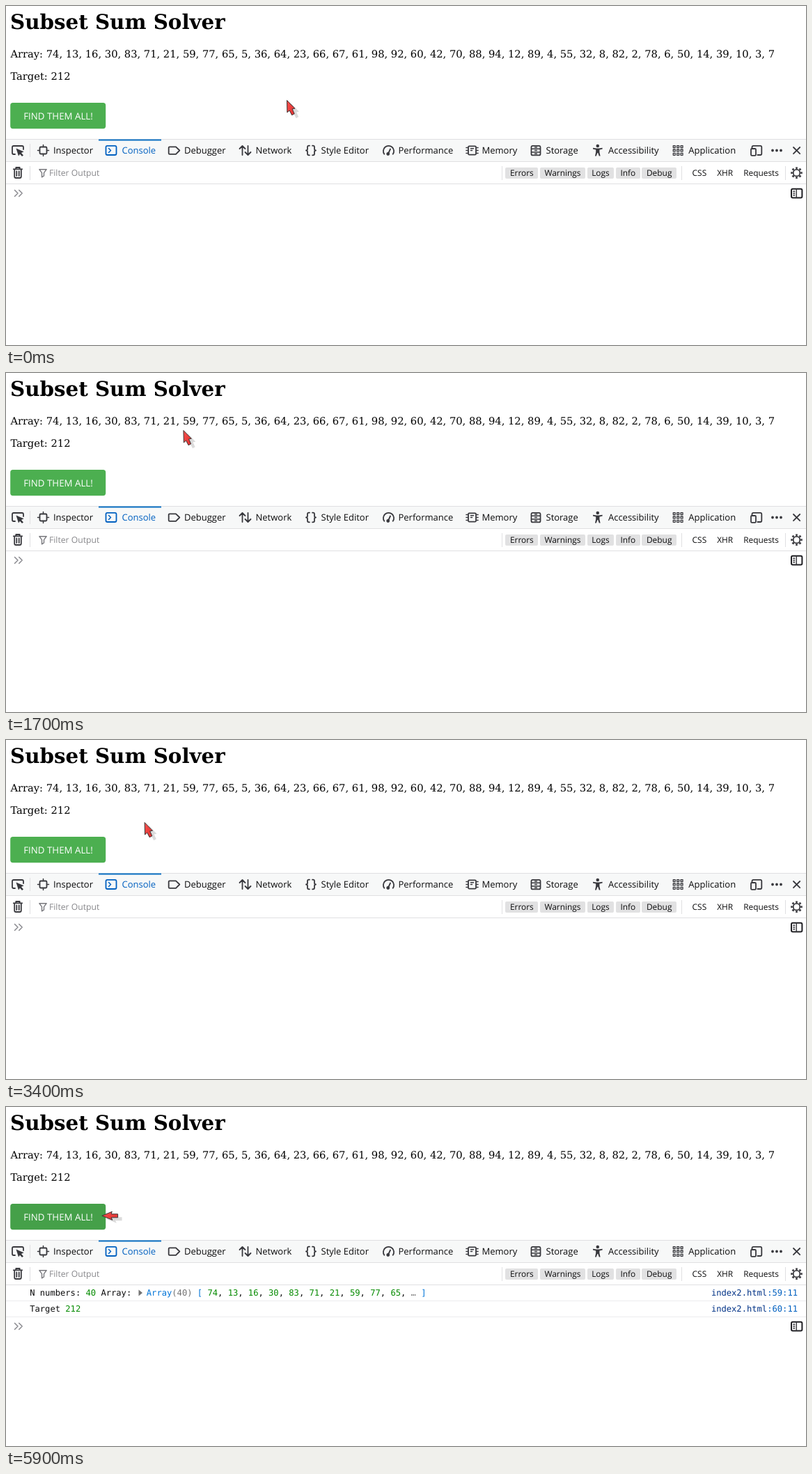
Animation of 1149 by 487 pixels, one loop 8000 ms. Source, as an HTML page:

```html
<!DOCTYPE html>
<html lang="en">
<head>
<meta charset="utf-8">
<title>Subset Sum Solver</title>
<style>
html, body { margin: 0; width: 100%; height: 100%; overflow: hidden; background: #fff; }
svg { display: block; }
text, .filters { font-family: "Open Sans", "Noto Sans", sans-serif; text-rendering: geometricPrecision; }
text { fill: #0c0c0d; white-space: pre; }
.page text { font: 14.7px "DejaVu Serif", serif; fill: #000; }
.page .title { font-weight: bold; font-size: 29.33px; }
.page .label { font: 13.3px "Open Sans", "Noto Sans", sans-serif; fill: #fff; }
.tabs text { font-size: 13px; stroke: none; }
.filters { position: absolute; top: 232px; display: flex; font-size: 11.9px; line-height: 16px; color: #0c0c0d; }
.pills { right: 186px; gap: 2.5px; }
.pills span { padding: 0 6.6px; border-radius: 2px; background: #e1e1e2; }
.plain { right: 39px; gap: 15px; }
.log text { font: 12.13px "DejaVu Sans Mono", monospace; }
.num { fill: #058b00; }
.obj { fill: #0074d8; }
.dim { fill: #737373; }
.file { fill: #003286; }
.line { fill: #0060c0; }
.icon { fill: none; stroke: #38383d; stroke-width: 1.8; stroke-linejoin: round; stroke-linecap: round; }
.icon .solid { fill: #38383d; stroke: none; }
.icon .active { stroke: #0060c0; }
.icon .active text { fill: #0060c0; }
.rule { stroke: #e0e0e2; }
</style>
</head>
<body>
<svg width="1149" height="487" viewBox="0 0 1149 487">
  <g class="page">
    <text class="title" x="6" y="33">Subset Sum Solver</text>
    <text id="array" x="6.4" y="74">Array: 74, 13, 16, 30, 83, 71, 21, 59, 77, 65, 5, 36, 64, 23, 66, 67, 61, 98, 92, 60, 42, 70, 88, 94, 12, 89, 4, 55, 32, 8, 82, 2, 78, 6, 50, 14, 39, 10, 3, 7</text>
    <text x="6.4" y="106">Target: 212</text>
    <rect id="button" x="6.2" y="139" width="137" height="37.3" rx="3.7"/>
    <text class="label" x="75" y="162.5" text-anchor="middle">FIND THEM ALL!</text>
  </g>

  <rect y="192" width="1149" height="31" fill="#f7f8f8"/>
  <path class="rule" d="M0 191.5H1149M0 223.5H1149M0 255.5H1149M34.5 198V217M34.5 230V250M712.5 230V250M970.5 230V250M1119.5 230V250"/>
  <rect x="133" y="191.5" width="90" height="2" fill="#0a70c4"/>

  <g class="icon">
    <path d="M13 213H11Q9 213 9 211V203Q9 201 11 201H23Q25 201 25 203V206"/>
    <path class="solid" d="M14.5 204.5L25.6 209.3L22 210.9L25 214.5L23 216L20 212.8L18 215.5Z"/>
  </g>

  <g class="icon tabs">
    <rect x="48.5" y="202.5" width="10" height="10" rx="1.5"/>
    <path d="M45.5 207.5H48M59 207.5H61.5M53.5 199.5V202M53.5 213V215.5" stroke-width="1.5"/>
    <text x="68" y="212">Inspector</text>

    <g class="active">
      <rect x="143.5" y="200.8" width="15" height="13.2" rx="2"/>
      <path d="M147.5 204.5L150.5 207.5L147.5 210.5" stroke-width="1.5"/>
      <text x="166.5" y="212">Console</text>
    </g>

    <path d="M235 202.3H244L249.3 207.5L244 212.8H235Q233.7 212.8 233.7 211.5V203.6Q233.7 202.3 235 202.3Z"/>
    <text x="256" y="212">Debugger</text>

    <path d="M339.5 214V201.5M335.5 205L339.5 201L343.5 205M347.5 201V213.5M343.5 210L347.5 214L351.5 210"/>
    <text x="358.5" y="212">Network</text>

    <path id="brace" d="M436 200.7H435Q433 200.7 433 203V205.3Q433 207.5 431 207.5Q433 207.5 433 209.7V212Q433 214.3 435 214.3H436"/>
    <use href="#brace" transform="matrix(-1 0 0 1 876 0)"/>
    <text x="452.5" y="212">Style Editor</text>

    <path d="M543.3 212.8A7.6 7.6 0 1 1 555.7 212.8M549 212L552 205.5"/>
    <circle class="solid" cx="548.7" cy="212.5" r="2.4"/>
    <text x="563.5" y="212">Performance</text>

    <rect x="664" y="201.3" width="11" height="12.4" rx="1.5"/>
    <path d="M661 203.5H663M661 207.5H663M661 211.5H663M676 203.5H678M676 207.5H678M676 211.5H678M667.5 204.7H671.5M667.5 207.5H669.5" stroke-width="1.6"/>
    <text x="683.5" y="212">Memory</text>

    <rect x="754.5" y="200.8" width="13" height="13.6" rx="2"/>
    <path d="M755 205.2H767M755 210H767M759.5 203H762.5M759.5 207.6H762.5M759.5 212.3H762.5" stroke-width="1.5"/>
    <text x="775.5" y="212">Storage</text>

    <circle class="solid" cx="849.8" cy="201" r="2.3"/>
    <path class="solid" d="M843 203.8L848 204.5H851.6L856.6 203.8V205.6L852.4 206.6V210L853.6 215.5H851.8L850.2 211H849.4L847.8 215.5H846L847.2 210V206.6L843 205.6Z"/>
    <text x="865" y="212">Accessibility</text>

    <g id="grid" stroke-width="1.3"></g>
    <text x="980.3" y="212">Application</text>
  </g>

  <g class="icon">
    <path d="M1071.5 209V203Q1071.5 200.8 1073.5 200.8H1083.5Q1085.3 200.8 1085.3 203V212Q1085.3 214 1083.5 214H1079.5"/>
    <rect x="1070" y="205" width="7" height="9.8" rx="1.3" fill="#f7f8f8"/>
    <path d="M1101 207.5H1113.1" stroke-width="3.8" stroke-dasharray="0 6"/>
    <path d="M1131 203L1140.2 212.2M1140.2 203L1131 212.2"/>
    <path d="M10.8 234.3H23.2M14.3 234V232H19.7V234M12.2 234.5V245Q12.2 247 14.2 247H19.8Q21.8 247 21.8 245V234.5M15.3 237.5V244M18.7 237.5V244"/>
    <path d="M47.8 234.7H58.2L54.5 239.7V244L51.5 245.8V239.7Z" stroke="#77777c" stroke-width="1.4"/>
    <circle cx="1135.5" cy="239.7" r="4.8"/>
    <circle cx="1135.5" cy="239.7" r="7" stroke-width="2.6" stroke-linecap="butt" pathLength="16" stroke-dasharray="1" stroke-dashoffset=".5"/>
  </g>
  <text x="62" y="244.3" font-size="12.2" style="fill:#88888c">Filter Output</text>

  <g id="log" class="log">
    <path d="M0 278.5H1149M0 301.5H1149" stroke="#ececee"/>
    <path d="M190.5 262.5L196 267L190.5 271.5Z" fill="#737373"/>
    <text x="34.2" y="271">N numbers: <tspan class="num">40</tspan> Array:</text>
    <text x="201.8" y="271" id="preview"></text>
    <text x="34.2" y="294">Target <tspan class="num">212</tspan></text>
    <text x="1137" y="271" text-anchor="end"><tspan class="file">index2.html</tspan><tspan class="line">:59:11</tspan></text>
    <text x="1137" y="294" text-anchor="end"><tspan class="file">index2.html</tspan><tspan class="line">:60:11</tspan></text>
  </g>
  <g id="prompt" class="icon">
    <path d="M12.5 264.5L17 269L12.5 273.5M18.7 264.5L23.2 269L18.7 273.5" stroke="#8a8a8f" stroke-width="1.5"/>
    <rect x="1128" y="262.8" width="15.4" height="12.8" rx="2" stroke="#202024" stroke-width="2"/>
    <path d="M1135.3 263V275M1130.8 266.3H1132.8M1130.8 269H1132.8M1130.8 271.7H1132.8" stroke-width="1.4"/>
  </g>

  <defs>
    <linearGradient id="red" x2="1" y2="1"><stop stop-color="#f8504c"/><stop offset="1" stop-color="#e03030"/></linearGradient>
    <path id="arrow" d="M.5 .5L11.9 12.2L8.1 12.9L11.2 19.8L7.6 21.7L4.1 15L.9 18Z"/>
    <path id="pointer" d="M.5 0L15 -6L13.8 -2.5H23.3V2.5H13.8L15.5 6Z"/>
  </defs>
  <g id="cursor" stroke-linejoin="round">
    <use class="shape" x="6" y="4.5" opacity=".14"/>
    <use class="shape" fill="url(#red)" stroke="#3c3434"/>
  </g>
</svg>
<div class="filters pills"><span>Errors</span><span>Warnings</span><span>Logs</span><span>Info</span><span>Debug</span></div>
<div class="filters plain"><span>CSS</span><span>XHR</span><span>Requests</span></div>
<script>
const LOOP = 8000, STEP = 100, HOVER_AT = 4200, FADE = 300, LOG_AT = 5900;
const $ = id => document.getElementById(id);
const shapes = document.querySelectorAll(".shape");

const cell = i => `<rect x="${958.3 + i % 3 * 5.4}" y="${200.6 + Math.floor(i / 3) * 5.4}" width="2.9" height="2.9"/>`;
$("grid").innerHTML = Array.from({ length: 9 }, (_, i) => cell(i)).join("");

const span = (cls, s) => `<tspan class="${cls}">${s}</tspan>`;
const numbers = $("array").textContent.match(/\d+/g);
$("preview").innerHTML = span("obj", "Array") + span("dim", `(${numbers.length})`) + span("obj", " [ ") +
  numbers.slice(0, 10).map(n => span("num", n) + ", ").join("") + span("dim", "…") + span("obj", " ]");

// The cursor rests, then glides from its last place to each key point.
const START = [403, 135];
const glides = [
  { from: 300, until: 400, to: [359, 121] },
  { from: 600, until: 1200, to: [149.3, 81] },
  { from: 1300, until: 1400, to: [183, 83] },
  { from: 1600, until: 2100, to: [397.3, 80] },
  { from: 2200, until: 2300, to: [441, 84] },
  { from: 2900, until: 3400, to: [198.6, 118] },
  { from: 3500, until: 3700, to: [154, 143] },
  { from: 3800, until: 4100, to: [144.8, 150.5] },
  { from: 4200, until: 4600, to: [141, 154] },
  { from: 4800, until: 4800, to: [137.3, 156.3] },
];

const clamp = k => Math.min(1, Math.max(0, k));
const mix = (a, b, k) => a.map((v, i) => v + (b[i] - v) * k);

function cursorAt(t) {
  const now = Math.floor(t / STEP) * STEP;
  return glides.reduce((place, { from, until, to }) =>
    mix(place, to, clamp((now - from + STEP) / (until - from + STEP))), START);
}

function draw(t) {
  const logged = t >= LOG_AT;
  const shape = t >= HOVER_AT ? "#pointer" : "#arrow";
  $("cursor").setAttribute("transform", `translate(${cursorAt(t)})`);
  for (const use of shapes) use.setAttribute("href", shape);
  $("button").setAttribute("fill", `rgb(${mix([76, 175, 80], [69, 160, 73], clamp((t - HOVER_AT) / FADE))})`);
  $("log").style.display = logged ? "" : "none";
  $("prompt").setAttribute("transform", `translate(0 ${logged ? 46 : 0})`);
}

const origin = performance.now();
function tick() {
  draw((performance.now() - origin) % LOOP);
  requestAnimationFrame(tick);
}
tick();
</script>
</body>
</html>
```
